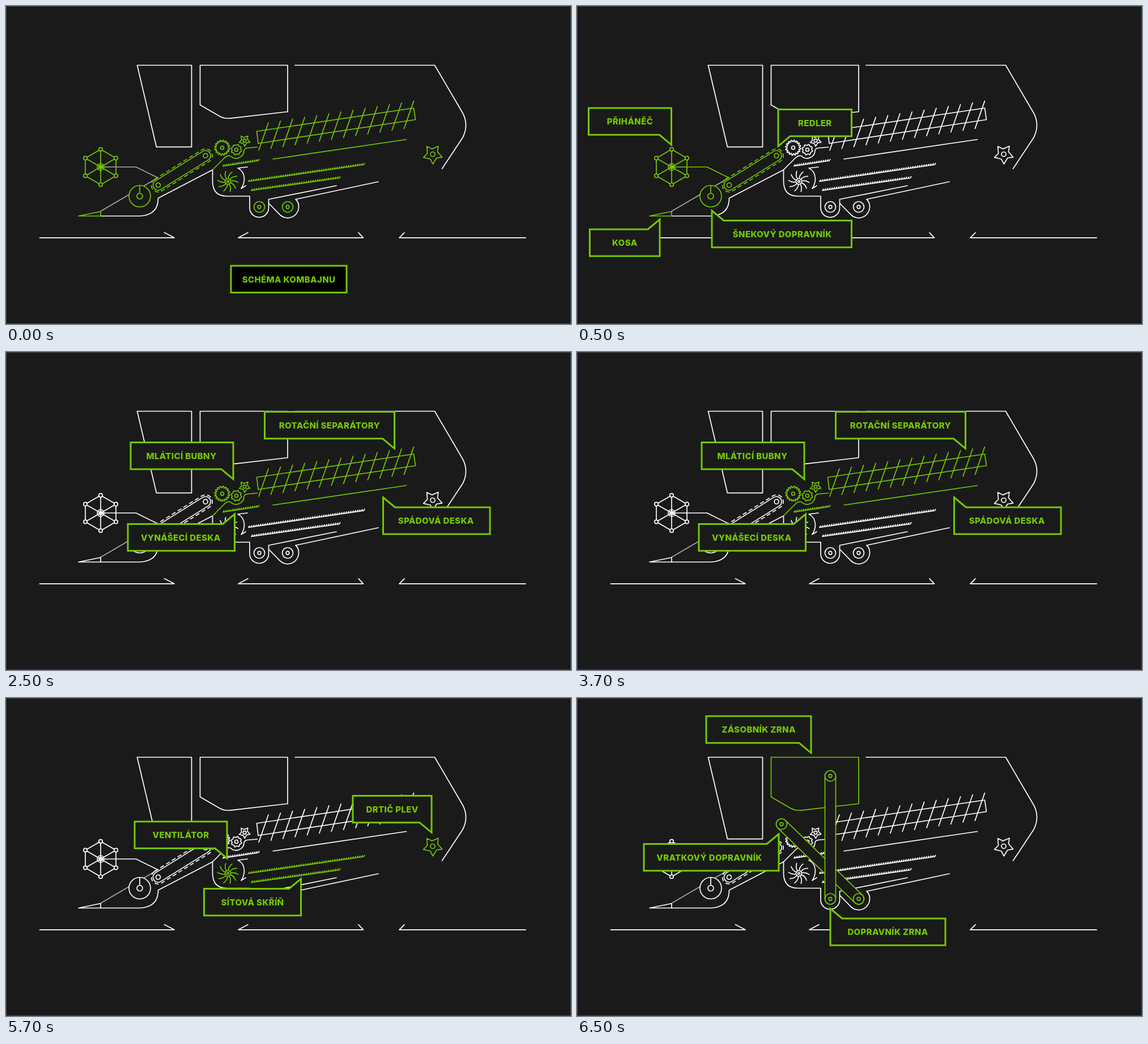
These frames come from a looping animation (997 px wide and 561 px high, 8000 ms). An HTML page:

```html
<!DOCTYPE html>
<html lang="cs">
<head>
<meta charset="utf-8">
<title>Schéma kombajnu</title>
<style>
  :root { --bg: #1a1a1a; --on: #74c800; --off: #fff; --dim: #a6a6a6; }
  html, body { margin: 0; width: 100%; height: 100%; overflow: hidden; background: var(--bg); }
  svg { display: block; width: 100vw; height: 100vh; }
  #machine { fill: none; stroke-width: 1.7; stroke-linejoin: round; stroke-linecap: round; color: var(--off); }
  #machine * { stroke: currentColor; }
  .solid { fill: var(--bg); }
  .dim { color: var(--dim); }
  .call path { fill: var(--bg); stroke: var(--on); stroke-width: 3; }
  #s0 path { fill: #000; }
  text { fill: var(--on); font: 800 15px Inter, Roboto, sans-serif; text-anchor: middle; letter-spacing: .35px; }

  .intake, .thresh, .clean, .lift, .tank, .arm, .slide { animation: 8s step-end infinite; }
  .intake { animation-name: intake; }
  .arm { animation-name: arm; }
  .thresh { animation-name: thresh; }
  .clean { animation-name: clean; }
  .lift { animation-name: lift; }
  .tank { animation-name: tank; }
  .s0 { animation-name: s0; }
  .s1 { animation-name: s1; }
  .s2 { animation-name: s2; }
  .s3 { animation-name: s3; }
  .s4 { animation-name: s4; }

  @keyframes intake { 0% { color: var(--on) } 31.25%, 100% { color: var(--off) } }
  @keyframes arm { 0% { color: var(--dim) } 6.25% { color: var(--on) } 31.25%, 100% { color: var(--off) } }
  @keyframes thresh { 0%, 31.25% { color: var(--on) } 6.25%, 56.25%, 100% { color: var(--off) } }
  @keyframes clean { 0%, 56.25% { color: var(--on) } 6.25%, 81.25%, 100% { color: var(--off) } }
  @keyframes lift { 0%, 81.25%, 100% { color: var(--on) } 6.25% { color: var(--off) } }
  @keyframes tank { 0% { color: var(--off) } 81.25%, 100% { color: var(--on) } }
  @keyframes s0 { 0% { opacity: 1 } 6.25%, 100% { opacity: 0 } }
  @keyframes s1 { 0%, 31.25%, 100% { opacity: 0 } 6.25% { opacity: 1 } }
  @keyframes s2 { 0%, 56.25%, 100% { opacity: 0 } 31.25% { opacity: 1 } }
  @keyframes s3 { 0%, 81.25%, 100% { opacity: 0 } 56.25% { opacity: 1 } }
  @keyframes s4 { 0% { opacity: 0 } 81.25%, 100% { opacity: 1 } }
</style>
</head>
<body>
<svg viewBox="0 0 997 561" preserveAspectRatio="none">
  <rect x=".5" y=".5" width="996" height="560" fill="none" stroke="#4c4c4c"/>
  <g id="machine">
    <!-- ground, cab and housing -->
    <path d="M59.5 408.8H297L279.500 399.8M427 399.8L410 408.8H630.5L622 399.8M703 399.8L694 408.8H917"/>
    <path d="M231.5 104.5H327.5V248.7H265.5Z"/>
    <path d="M510 104.5H756.5L806 189Q817 210 806 232L769.5 287"/>
    <path d="M167 370.5H236Q268.5 369 268.5 339L364.5 289V309Q364.5 335.5 390 335.5H430V356A16.7 16.7 0 0 0 463.5 356V341L583 317"/>
    <path d="M464 348.5L483.5 368.4A19.5 19.5 0 0 0 516.5 355.5Q517 346 511 341L657 310"/>
    <path d="M426 284L409 286Q420 291 420.5 305Q420 315 415 322L423 317"/>
    <path class="dim" d="M167 362L268 303"/>
    <path class="tank" d="M342.5 104.5H497V186.5L398 197.8Q386 199.5 377 194.5L342.5 174.5Z"/>

    <path class="arm" d="M167 284H229.5L268 303"/>
    <g class="intake">
      <g id="reel"></g>
      <path d="M128 370.5L167 362.5V370.5Z"/>
      <circle class="solid" cx="236" cy="335.5" r="19"/>
      <circle cx="236" cy="335.5" r="5"/>
      <path d="M236 330.5V317"/>
      <g transform="translate(268.5 316) rotate(-31.9)">
        <rect x="-12" y="-12" width="122.4" height="24" rx="12" stroke-dasharray="7.5 4.5" stroke-linecap="butt"/>
        <rect class="solid" x="-9" y="-9" width="116.4" height="18" rx="9"/>
        <circle r="4"/>
        <circle cx="98.4" r="4"/>
      </g>
    </g>

    <g class="thresh" id="thresh">
      <path d="M364.5 289L387 266.5Q391 263 396 264.5A14 14 0 0 0 420 255Q421 251 426 250.5L443.5 249"/>
      <path d="M442.5 221L719.5 180L722.5 200.5L445 242.5Z"/>
      <path d="M471 270L706.5 235.5"/>
    </g>
    <g class="clean" id="clean"></g>

    <g class="lift">
      <g class="slide s4">
        <g id="belts" class="solid"></g>
      </g>
      <g id="pulleys"></g>
    </g>
  </g>
  <g id="calls"></g>
</svg>

<script>
const NS = 'http://www.w3.org/2000/svg';
const $ = id => document.getElementById(id);

function add(parent, tag, attrs, text) {
  const el = document.createElementNS(NS, tag);
  for (const k in attrs) el.setAttribute(k, attrs[k]);
  if (text) el.textContent = text;
  parent.appendChild(el);
  return el;
}
const path = (g, d, cls = '') => add(g, 'path', { d, class: cls });
const ring = (g, cx, cy, r, cls = '') => add(g, 'circle', { cx, cy, r, class: cls });

function polar(cx, cy, r, deg) {
  const a = deg * Math.PI / 180;
  return (cx + r * Math.cos(a)).toFixed(2) + ' ' + (cy + r * Math.sin(a)).toFixed(2);
}

// Closed wheel; each tooth is a list of [radius, angle offset]
function wheel(g, cx, cy, n, start, tooth) {
  const pts = [];
  for (let i = 0; i < n; i++)
    for (const [r, off] of tooth) pts.push(polar(cx, cy, r, start + i * 360 / n + off));
  path(g, 'M' + pts.join('L') + 'Z', 'solid');
}

function star(g, cx, cy, r, hub) {
  wheel(g, cx, cy, 5, -55, [[r, 0], [r * .55, 28]]);
  ring(g, cx, cy, hub);
}

function gear(g, cx, cy, n, r, depth) {
  const s = 360 / n;
  wheel(g, cx, cy, n, 0, [[r - depth, 0], [r, s * .2], [r, s * .5], [r - depth, s * .7]]);
  ring(g, cx, cy, 3);
}

// Toothed sieve along a line
function sieve(g, x1, y1, x2, y2) {
  const n = Math.round((x2 - x1) / 4);
  let d = `M${x1} ${y1}L${x2} ${y2}`;
  for (let i = 0; i <= n; i++) {
    const x = x1 + (x2 - x1) * i / n, y = y1 + (y2 - y1) * i / n;
    d += `M${x.toFixed(1)} ${y.toFixed(1)}l1.8 -2.6`;
  }
  path(g, d);
}

// Reel
const reel = $('reel');
const tips = [0, 1, 2, 3, 4, 5].map(i => polar(167, 284, 31.2, i * 60 - 90));
path(reel, 'M' + tips.join('L') + 'Z' + tips.map(p => 'M167 284L' + p).join(''));
tips.forEach(p => ring(reel, ...p.split(' '), 3.2, 'solid'));
ring(reel, 167, 284, 6);
ring(reel, 167, 284, 3);

// Threshing drums, rotors and plate
const thresh = $('thresh');
gear(thresh, 381.5, 250, 16, 13.3, 2.6);
gear(thresh, 406.5, 253.5, 8, 9.3, 1.6);
star(thresh, 421, 237.5, 10, 2.8);
let blades = '';
for (let i = 0; i < 13; i++)
  blades += `M${(463 + i * 21.37).toFixed(1)} ${(206 - i * 3.2).toFixed(1)}l-17 48.5`;
path(thresh, blades);
sieve(thresh, 383, 282.5, 445, 273);

// Fan, sieves and chopper
const clean = $('clean');
const fan = add(clean, 'g', { transform: 'translate(391.5 309.5)' });
for (let i = 0; i < 10; i++)
  add(fan, 'path', { d: 'M5.5 0Q12 -.5 17.5 5', transform: `rotate(${i * 36 - 10})` });
ring(fan, 0, 0, 5);
ring(fan, 0, 0, 1.8);
sieve(clean, 428, 309.5, 631, 280);
sieve(clean, 433, 325.5, 588, 303.5);
star(clean, 753, 261.5, 17.3, 4);

// Grain elevators
const belts = $('belts');
function belt(x1, y1, x2, y2) {
  const len = Math.hypot(x2 - x1, y2 - y1), deg = Math.atan2(y2 - y1, x2 - x1) * 180 / Math.PI;
  add(belts, 'rect', {
    x: -9.5, y: -9.5, width: len + 19, height: 19, rx: 9.5,
    transform: `translate(${x1} ${y1}) rotate(${deg})`
  });
}
function pulley(g, x, y) {
  ring(g, x, y, 9.5);
  ring(g, x, y, 2.8);
}
belt(361, 222.5, 497, 354.5);
belt(447, 137.5, 447, 354.5);
pulley(belts, 361, 222.5);
pulley(belts, 447, 137.5);
pulley($('pulleys'), 447, 354.5);
pulley($('pulleys'), 497, 354.5);

// Labels: x, y, right edge, pointer corner, text, text shift
const slides = [
  [[397, 458.2, 601, '', 'SCHÉMA KOMBAJNU']],
  [[20.5, 180, 166.5, 'br', 'PŘIHÁNĚČ'], [355, 182.5, 484.5, 'bl', 'REDLER'],
   [22.5, 394, 146, 'tr', 'KOSA'], [238, 378.5, 484.5, 'tl', 'ŠNEKOVÝ DOPRAVNÍK', 1]],
  [[456.5, 105.5, 685.5, 'br', 'ROTAČNÍ SEPARÁTORY'], [220, 159.5, 401, 'br', 'MLÁTICÍ BUBNY', -1],
   [215, 303.5, 403.5, 'tr', 'VYNÁŠECÍ DESKA', -1], [665.5, 274, 854, 'tl', 'SPÁDOVÁ DESKA', -1]],
  [[612, 172.5, 751, 'br', 'DRTIČ PLEV'], [227, 218, 390, 'br', 'VENTILÁTOR'],
   [349.5, 336.5, 520.5, 'tr', 'SÍTOVÁ SKŘÍŇ']],
  [[228, 32, 413, 'br', 'ZÁSOBNÍK ZRNA'], [118, 257.5, 356, 'tr', 'VRATKOVÝ DOPRAVNÍK', -3.5],
   [447, 389, 650, 'tl', 'DOPRAVNÍK ZRNA']]
];

function label(g, [x, y, right, tip, text, shift = 0]) {
  const bottom = y + 47.3, w = 21, h = 17.5;
  const pointed = {
    tl: `${x + w} ${y}L${x} ${y - h}`,
    bl: `${x} ${bottom + h}L${x + w} ${bottom}`,
    br: `${right - w} ${bottom}L${right} ${bottom + h}`,
    tr: `${right} ${y - h}L${right - w} ${y}`
  };
  const plain = { tl: `${x} ${y}`, bl: `${x} ${bottom}`, br: `${right} ${bottom}`, tr: `${right} ${y}` };
  const pts = ['tl', 'bl', 'br', 'tr'].map(c => (c === tip ? pointed : plain)[c]);
  path(g, 'M' + pts.join('L') + 'Z');
  add(g, 'text', { x: (x + right) / 2 + shift, y: y + 29.4 }, text);
}

slides.forEach((list, i) => {
  const g = add($('calls'), 'g', { id: 's' + i, class: 'call slide s' + i });
  list.forEach(item => label(g, item));
});
</script>
</body>
</html>
```
